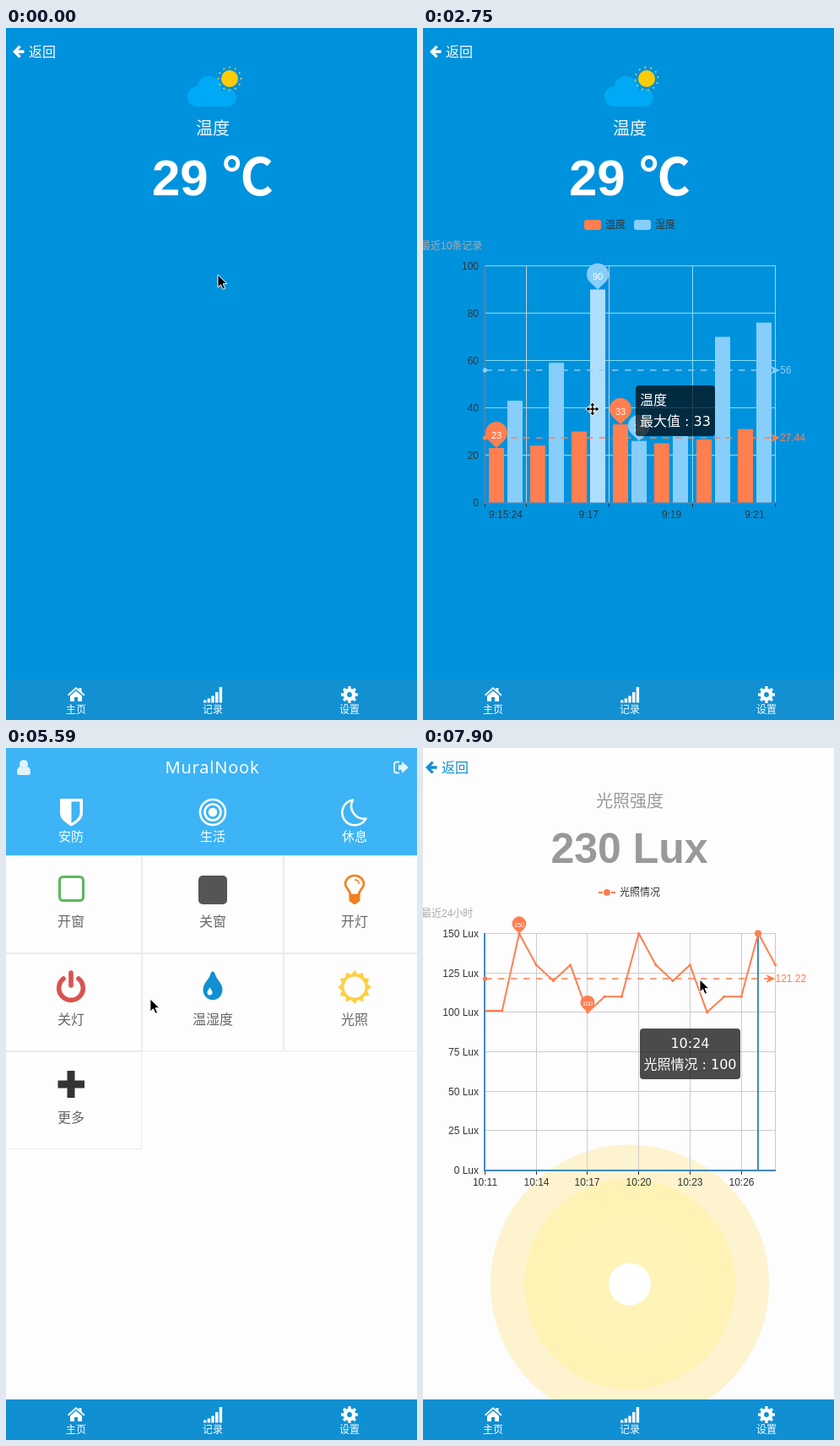
Animation of 487 by 819 pixels, one loop 7.99 s. Source, as an HTML page:

```html
<!DOCTYPE html>
<html lang="zh">
<head>
<meta charset="utf-8">
<style>
html, body { margin: 0; width: 100%; height: 100%; overflow: hidden; background: #fdfdfd; }
svg { display: block; width: 100%; height: 100%; }
text { font-family: 'Liberation Sans', 'Noto Sans CJK SC', 'Noto Sans CJK', sans-serif; white-space: pre; }
.mid { text-anchor: middle; }
.thin { font-family: 'Noto Sans CJK SC', 'Noto Sans CJK', sans-serif; font-weight: 300; font-size: 20px; }
.big { font-weight: bold; }
.f11 { font-size: 11px; }
.f12 { font-size: 12px; }
.f15 { font-size: 15px; }
.f16 { font-size: 16px; }
.tip { font: 16px 'DejaVu Sans', 'Noto Sans CJK SC', 'Noto Sans CJK', sans-serif; fill: #fff; }
.brand { font: 20px 'Noto Sans', sans-serif; letter-spacing: .8px; fill: #fff; }
</style>
</head>
<body>
<svg viewBox="0 0 487 819" preserveAspectRatio="none">
  <defs>
    <g id="back">
      <path d="M8 28l7.5-7.5 2.2 2.2-3.4 3.5h7.2v3.6h-7.2l3.4 3.5-2.2 2.2z"/>
      <text class="f16" x="27" y="33.500">返回</text>
    </g>
  </defs>

  <g id="climate">
    <path fill="#0092dc" d="M0 0h487v771H0z"/>
    <use href="#back" fill="#fff"/>
    <g fill="#00a9f5">
      <circle cx="227" cy="81" r="12"/>
      <circle cx="240.500" cy="71.500" r="14.500"/>
      <circle cx="262.500" cy="82.500" r="10.500"/>
      <path d="M227 75h35v18h-35z"/>
    </g>
    <circle cx="265" cy="60" r="10" fill="#ffcb05"/>
    <g id="rays" fill="#ffd22e"></g>
    <text class="thin mid" x="245" y="126" fill="#eef7fd">温度</text>
    <text class="big" x="173" y="198" font-size="60" fill="#fff">29 ℃</text>
    <g id="barChart"></g>
  </g>

  <g id="home">
    <path fill="#fdfdfd" d="M0 0h487v771H0z"/>
    <path fill="#3cb4f5" d="M0 0h487v127H0z"/>
    <g fill="#e4f2fb">
      <circle cx="21" cy="19" r="5"/>
      <path d="M13 29c0-5 2-7 4-7 2 2 6 2 8 0 2 0 4 2 4 7 0 2-1 3-3 3H16c-2 0-3-1-3-3z"/>
      <path d="M465 20h4v-4l8 7-8 7v-4h-4z"/>
      <path d="M466 16.500h-3q-3 0-3 3v7q0 3 3 3h3" fill="none" stroke="#e4f2fb" stroke-width="1.800"/>
    </g>
    <text class="brand mid" x="244.500" y="30">MuralNook</text>
    <path fill="#fff" d="M64 60h27v17c0 8-9 13-13.500 15.500C73 90 64 85 64 77z"/>
    <path fill="#3cb4f5" d="M77.500 63.500h10V77c0 5-5 9-10 12z"/>
    <g fill="none" stroke="#fff" stroke-width="2.600">
      <circle cx="245" cy="76" r="15"/>
      <circle cx="245" cy="76" r="9.500"/>
      <circle cx="245" cy="76" r="4" fill="#fff"/>
      <path stroke-linejoin="round" d="M411 61.500a15 15 0 1 0 15.500 22A15 15 0 0 1 411 61.500z"/>
    </g>
    <g id="tiles"></g>
    <rect x="63.500" y="152.500" width="28" height="28" rx="4" fill="none" stroke="#5cb85c" stroke-width="3"/>
    <rect x="228" y="151" width="34" height="34" rx="5" fill="#555"/>
    <path fill="none" stroke="#f47f20" stroke-width="2.600" d="M408 174c0-6-6-8-6-13a11 10 0 0 1 22 0c0 5-6 7-6 13z"/>
    <path fill="none" stroke="#f47f20" stroke-width="1.500" d="M413 156q5 0 5.500 5"/>
    <path fill="#f47f20" d="M406.500 173h13v8l-3 2q-3.500 4-7 0l-3-2z"/>
    <g fill="none" stroke="#d9534f" stroke-width="5.600" stroke-linecap="round">
      <path d="M68 273a14.300 14.300 0 1 0 18 0M77 266v15"/>
    </g>
    <path fill="#108fd2" d="M245 264.500q2 0 3 4c2 6 8.500 10 8.500 18a11.500 11.500 0 0 1-23 0c0-8 6.500-12 8.500-18q1-4 3-4z"/>
    <path fill="#fff" d="M241.500 283c1 3 3 4 3 6.500a3 3 0 0 1-6 0c0-2.500 2-3.500 3-6.500z"/>
    <polygon id="sunStar" fill="#fdd044"/>
    <circle cx="413" cy="283" r="12.500" fill="#fdfdfd"/>
    <path stroke="#333" stroke-width="9" d="M61.500 398h31.500M77 382v32"/>
  </g>

  <g id="light">
    <path fill="#fdfdfd" d="M0 0h487v771H0z"/>
    <use href="#back" x="-5" y="-5" fill="#108fd2"/>
    <text class="thin mid" x="245" y="70" fill="#999">光照强度</text>
    <text class="big mid" x="244.500" y="136" font-size="50" fill="#999">230 Lux</text>
    <g id="glow"></g>
    <g id="lineChart"></g>
  </g>

  <g id="nav" fill="#fff">
    <path id="navBar" fill="#108fd2" d="M0 771h487v48H0z"/>
    <path d="M73 789l10-9 3.500 3v-2h3v4.500l4 3.500-1.200 1.500L83 782.500l-8.800 8z"/>
    <path d="M76 790.500l7-6 7 6v6.500h-5v-5h-4v5h-5z"/>
    <path d="M234 795.500h3.400v3H234zM238.700 793.500h3.400v5h-3.400zM243.300 790.500h3.400v8h-3.400zM248 786h3.400v12.500H248zM252.700 780h3.400v18.500h-3.400z"/>
    <g fill="none" stroke="#fff">
      <circle cx="407" cy="789" r="5.200" stroke-width="4.600"/>
      <circle cx="407" cy="789" r="8.200" stroke-width="3.400" pathLength="16" stroke-dasharray="1" stroke-dashoffset=".5"/>
    </g>
    <g class="f12 mid">
      <text x="83" y="811">主页</text><text x="245" y="811">记录</text><text x="407" y="811">设置</text>
    </g>
  </g>

  <g id="pointer" stroke-linejoin="round">
    <path id="arrow" stroke="#fff" d="M0 0v15l3.600-3.300 2.500 5.600 2.600-1.100-2.500-5.500h4.800z"/>
    <path id="move" stroke="#fff" d="M0-8l3.500 4H1.200v2.800H4v-2.300L8 0 4 3.500V1.200H1.200V4h2.300L0 8l-3.500-4h2.300V1.200H-4v2.300L-8 0l4-3.500v2.300h2.800V-4h-2.300z"/>
    <path id="hand" fill="#fff" stroke="#000" stroke-width="1.200" transform="scale(1.120)" d="M0 1q1-2 2.500 0l2 5 1-1 1.500 1 1-1 1.500 1q2-.5 2 2l.5 4-2 4H4.500L0 11.500q-2-3 0-3l1.500 1z"/>
  </g>
</svg>
<script>
const LOOP = 7990, HOME_AT = 5090, LIGHT_AT = 5990, BARS_AT = 426, LINE_AT = 6741;
const CORAL = '#ff7f50', SKY = '#87cefa', CYAN = '#86e0f2', AXIS = '#4488bb';
const $ = id => document.getElementById(id);
const show = (id, on) => $(id).setAttribute('display', on ? 'inline' : 'none');
const clamp = v => Math.max(0, Math.min(1, v));
const times = (n, fn) => Array.from({ length: n }, (_, i) => fn(i)).join('');

const text = (x, y, s, cls, fill = '#333', anchor = 'start') =>
  `<text class="${cls}" x="${x}" y="${y}" fill="${fill}" text-anchor="${anchor}">${s}</text>`;
const line = (x1, y1, x2, y2, color, extra = '') =>
  `<path d="M${x1} ${y1}L${x2} ${y2}" stroke="${color}" fill="none" ${extra}/>`;
const thick = (x1, y1, x2, y2, color) => line(x1, y1, x2, y2, color, 'stroke-width="2"');
const rect = (x, y, w, h, fill, rx = 0) =>
  `<rect x="${x}" y="${y}" width="${w}" height="${h}" rx="${rx}" fill="${fill}"/>`;
const dot = (x, y, r, fill) => `<circle cx="${x}" cy="${y}" r="${r}" fill="${fill}"/>`;

const pin = (x, y, label, color, scale) =>
  `<g transform="translate(${x} ${y}) scale(${scale})">
    <path fill="${color}" d="M0 0L-9-8.600A13 13 0 1 1 9-8.600z"/>
    ${text(0, -11.5, label, 'f11', '#fff', 'middle')}</g>`;

const average = (y, label, color, end, grow) => {
  const x = 74 + (end - 74) * grow;
  return dot(73.5, y, 2.7, color) + line(74, y, x - 5, y, color, 'stroke-width="1.5" stroke-dasharray="7.5"')
    + `<path fill="${color}" d="M${x} ${y}l-11-5 3 5-3 5z"/>` + text(x, y + 4, label, 'f12', color);
};

const tooltip = (x, y, w, top, bottom, centred) => {
  const tx = centred ? x + w / 2 : x + 5, anchor = centred ? 'middle' : 'start';
  return rect(x, y, w, 60, 'rgba(0,0,0,.7)', 4)
    + text(tx, y + 23, top, 'tip', '#fff', anchor) + text(tx, y + 48, bottom, 'tip', '#fff', anchor);
};

// Exponential ease-out that settles once the rest is below a pixel or so.
const growth = (elapsed, duration) => {
  const e = 1 - 2 ** (-10 * Math.max(0, elapsed) / duration);
  return e > .987 ? 1 : e;
};

const path = [
  [0, 251, 292], [1900, 251, 292], [2400, 236, 446], [2560, 228, 452], [2750, 201, 451],
  [3050, 158, 450], [3390, 158, 455], [3620, 95, 520], [4000, 306, 510], [4220, 306, 510],
  [4400, 19, 10], [5150, 19, 10], [5590, 170, 297], [5850, 402, 302], [7580, 402, 302], [7900, 328, 274]
];
function cursorAt(t) {
  const i = path.findIndex(p => p[0] > t);
  if (i < 0) return path[path.length - 1].slice(1);
  const [t0, x0, y0] = path[i - 1], [t1, x1, y1] = path[i];
  const k = (t - t0) / (t1 - t0);
  return [x0 + (x1 - x0) * k, y0 + (y1 - y0) * k];
}

const temps = [23, 24, 30, 33, 25, 26.6, 31], damps = [43, 59, 90, 26, 28, 70, 76];
const BASE = 561.5, PITCH = 49.14;
const barY = v => BASE - v * 2.8;
const bars = temps.flatMap((v, i) => {
  const x = Math.round(77.9 + i * PITCH);
  return [{ x, v, color: CORAL }, { x: x + 22, v: damps[i], color: SKY }];
});
const barUnder = (x, y) => bars.find(b => x >= b.x && x <= b.x + 18 && y > barY(b.v) && y < BASE);

const barFrame = rect(191, 227, 20, 12, CORAL, 3) + text(216, 237, '温度', 'f12')
  + rect(250, 227, 20, 12, SKY, 3) + text(275, 237, '湿度', 'f12')
  + text(-3, 262, '最近10条记录', 'f12', '#aaa')
  + times(6, i => line(73, BASE - i * 56, 418, BASE - i * 56, CYAN)
    + text(66, BASE - i * 56 + 4, i * 20, 'f12', '#333', 'end'))
  + times(4, i => {
    const x = Math.round(73 + (2 * i + 1) * PITCH) + .5;
    return line(x, 281, x, 562, i < 2 ? '#ccc' : CYAN) + line(x, 562, x, 567, '#333')
      + text(98 + i * 98.3, 580, ['9:15:24', '9:17', '9:19', '9:21'][i], 'f12 mid');
  })
  + thick(73, 281, 73, 563, AXIS) + line(73.5, 563, 73.5, 567, '#333');

function barChart(t, hovered) {
  if (t < BARS_AT) return '';
  const g = growth(t - BARS_AT, 2000);
  const pinFor = (i, label) => pin(bars[i].x + 9, barY(bars[i].v) + (1 - g) * 14, label, bars[i].color, g);
  let out = barFrame + thick(72, 562, 418, 562, AXIS)
    + bars.map(b => rect(b.x, BASE - b.v * 2.8 * g, 18, b.v * 2.8 * g, b.color)).join('');
  if (hovered) out += rect(hovered.x, barY(hovered.v), 18, hovered.v * 2.8, 'rgba(255,255,255,.32)');
  out += average(485, '27.44', CORAL, 423, g) + average(405, '56', SKY, 423, g)
    + pinFor(0, 23) + pinFor(5, 90) + pinFor(6, 33) + pinFor(7, 26);
  if (t > 2440 && t < 2860) out += tooltip(252, 423, 94, '温度', '最大值 : 33');
  else if (t >= 2860 && t < 3400) out += tooltip(221, 471, 90, '湿度', '9:17 : 90');
  else if (t > 3960 && t < 4240) out += tooltip(252, 423, 90, '湿度', '9:19 : 28');
  return out;
}

const lux = [101, 101, 150, 130, 120, 130, 100, 110, 110, 150, 130, 120, 130, 100, 110, 110, 150, 130];
const luxX = i => 73.5 + i * 20.24;
const luxY = v => 499.5 - v * 280 / 150;
const lineFrame = thick(208, 171, 213, 171, CORAL) + thick(223, 171, 228, 171, CORAL)
  + dot(218, 171, 4, CORAL) + text(233, 175, '光照情况', 'f12') + text(-2, 200, '最近24小时', 'f12', '#aaa')
  + times(7, i => {
    const y = Math.round(499 - i * 46.667) + .5;
    return line(73, y, 418, y, '#ccc') + text(66, y + 4, i * 25 + ' Lux', 'f12', '#333', 'end');
  })
  + times(6, i => {
    const x = Math.round(73 + i * 60.7) + .5;
    return line(x, 219, x, 500, '#ccc') + line(x, 500, x, 505, '#333')
      + text(x, 518, '10:' + (11 + i * 3), 'f12 mid');
  })
  + line(417.5, 219, 417.5, 500, '#ccc')
  + thick(73, 219, 73, 501, AXIS) + thick(72, 500, 418, 500, AXIS);

function lineChart(t) {
  if (t < 6770) return '';
  const g = growth(t - LINE_AT, 1800);
  const points = lux.map((v, i) => [luxX(i), luxY(lux[0] + (v - lux[0]) * g)]);
  let out = lineFrame;
  const pointing = t > 7600;
  if (pointing) out += thick(397, 219, 397, 500, AXIS);
  out += `<polyline points="${points}" fill="none" stroke="${CORAL}" stroke-width="2" stroke-linejoin="round"/>`
    + average(273, '121.22', CORAL, 417.5, g);
  const pinScale = .65 * clamp((t - 7560) / 320);
  if (pinScale) {
    out += points.slice(1).map(([x, y]) => dot(x, y, 1.6, CORAL)).join('')
      + pin(luxX(2), luxY(150), 150, CORAL, pinScale) + pin(luxX(6), luxY(100), 100, CORAL, pinScale);
  }
  if (pointing) {
    out += dot(397, 219.5, 4, CORAL)
      + tooltip(257, 332, 119, t < 7800 ? '10:27' : '10:24', '光照情况 : ' + (t < 7800 ? 150 : 100), true);
  }
  return out;
}

function glow(t) {
  const ring = (delay, color) => {
    const age = t - 6800 - delay;
    return age > 0 ? dot(245, 634.5, 25 + age * .1273, color) : '';
  };
  return ring(0, '#fef3cf') + ring(315, '#fef3b5') + ring(705, '#fef4b9')
    + (t > 6800 ? dot(245, 634.5, 25, '#fff') : '');
}

$('rays').innerHTML = times(12, i => `<circle cx="265" cy="46.500" r="1" transform="rotate(${i * 30} 265 60)"/>`);
$('tiles').innerHTML = ['开窗', '关窗', '开灯', '关灯', '温湿度', '光照', '更多'].map((name, i) => {
  const x = -7 + 168 * (i % 3), y = 127 + 116 * Math.floor(i / 3);
  return `<rect x="${x + .5}" y="${y + .5}" width="167" height="115" fill="none" stroke="#ebebeb"/>`
    + text(x + 84, y + 83.5, name, 'f16 mid', '#666');
}).join('') + ['安防', '生活', '休息'].map((name, i) => text(77 + 168 * i, 110, name, 'f15 mid', '#fff')).join('');
$('sunStar').setAttribute('points', Array.from({ length: 24 }, (_, i) => {
  const a = i * Math.PI / 12, r = i % 2 ? 15.5 : 20;
  return [413 + r * Math.sin(a), 283 - r * Math.cos(a)];
}).join(' '));

function draw() {
  const t = performance.now() % LOOP;
  const [x, y] = cursorAt(t);
  const page = t < HOME_AT ? 'climate' : t < LIGHT_AT ? 'home' : 'light';
  for (const id of ['climate', 'home', 'light']) show(id, id === page);
  $('navBar').setAttribute('fill', page === 'climate' ? '#1290d2' : '#108fd2');

  const hovered = page === 'climate' && t > 2300 && barUnder(x, y);
  if (page === 'climate') {
    $('rays').setAttribute('transform', `rotate(${t * .03} 265 60)`);
    $('barChart').innerHTML = barChart(t, hovered);
  } else if (page === 'light') {
    $('glow').innerHTML = glow(t);
    $('lineChart').innerHTML = lineChart(t);
  }

  const kind = t > 4380 && t < 5150 ? 'hand' : hovered ? 'move' : 'arrow';
  for (const id of ['arrow', 'move', 'hand']) show(id, id === kind);
  $('pointer').setAttribute('transform', `translate(${x} ${y})`);
  requestAnimationFrame(draw);
}
draw();
</script>
</body>
</html>
```
